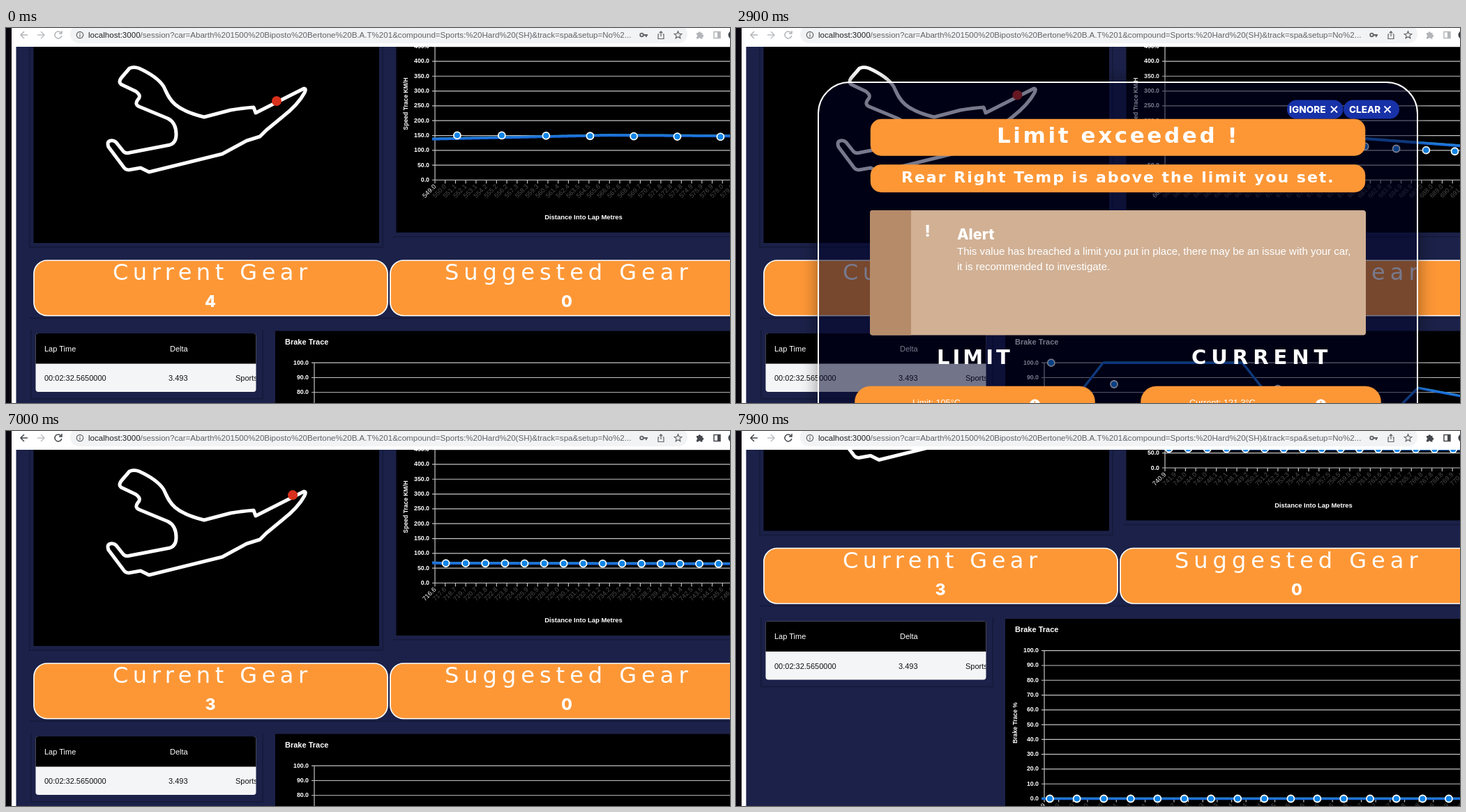
Recreate the animation shown at these times as an HTML page. Size 1038x539 px, loop 8000 ms.

```html
<!DOCTYPE html>
<html lang="en">
<head>
<meta charset="utf-8">
<title>Session dashboard</title>
<style>
  html, body { margin: 0; width: 100%; height: 100%; overflow: hidden; background: #08050f; }
  #stage { position: absolute; left: 0; top: 0; width: 1038px; height: 539px; overflow: hidden; }
  svg { position: absolute; left: 0; top: 0; display: block; }
  text { font-family: "Liberation Sans", Arial, sans-serif; fill: #fff; white-space: pre; }
  .wide { font-family: "DejaVu Sans", sans-serif; }
  .heavy { font-family: Inter, sans-serif; font-weight: 800; }
  .mid { text-anchor: middle; }
  .dark { fill: #111; }
  .tick { font-size: 8.8px; font-weight: 700; text-anchor: end; stroke: none; }
  .axis { font-size: 8.65px; font-weight: 700; text-anchor: middle; }
  .dist { font-size: 9.2px; text-anchor: end; fill: #4d4d4d; }
  .dist.first { fill: #fff; }
  .cell { font-size: 11px; }
  .grid { stroke: #c4c4c4; stroke-width: 1.2; fill: none; }
  .mark { fill: #1085e8; stroke: #fff; stroke-width: 1.8; }
  .orange { fill: #fd9736; }
  #view { position: absolute; left: 8px; top: 27px; width: 1030px; height: 512px; overflow: hidden; background: #fff; }
  #view svg { left: -8px; top: -27px; }
  #modal, #shade { position: absolute; inset: 0; }
  #shade { background: #000; }
  #panel { position: absolute; left: 109px; top: 50px; width: 857px; height: 700px;
    border: 2px solid #fff; border-radius: 46px; background: rgba(0, 2, 40, .53);
    box-shadow: 0 0 24px rgba(0, 0, 0, .4); }
  #icons { --ink: #b3b5b8; fill: none; stroke-width: 1.5; }
  #icons.active { --ink: #45484c; }
  .ink { stroke: var(--ink); }
  .soft { stroke: #5f6368; }
</style>
</head>
<body>
<div id="stage">
  <svg width="1038" height="27">
    <rect x="8" width="1030" height="27" fill="#fff"/>
    <rect x="92" y="-4" width="885" height="26" rx="13" fill="#f1f3f4"/>
    <text x="118" y="14" font-size="11.57" style="fill:#5f6368"><tspan fill="#202124">localhost:3000</tspan>/session?car=Abarth%201500%20Biposto%20Bertone%20B.A.T%201&amp;compound=Sports:%20Hard%20(SH)&amp;track=spa&amp;setup=No%2...</text>
    <g id="icons">
      <path class="ink" d="M31 10H21M26 5l-5 5 5 5"/>
      <path d="M45 10h10M50 5l5 5-5 5" stroke="#bfc1c4"/>
      <path class="ink" d="M79 7a5 5 0 1 0 .8 4M80 4v4h-4"/>
      <circle class="soft" cx="106" cy="10" r="4.7" stroke-width="1.2"/>
      <path class="soft" d="M106 9.3v3.4M106 7v1.3" stroke-width="1.2"/>
      <circle class="soft" cx="911.5" cy="10" r="2.3" stroke-width="1.8"/>
      <path class="soft" d="M914 10h6M917.8 10v3" stroke-width="2"/>
      <path class="soft" d="M936.5 9H935v6.5h8V9h-1.5M939 12V5M936.7 7.2l2.3-2.4 2.3 2.4" stroke-width="1.2"/>
      <path class="soft" d="M963.5 4.8l1.5 3.5 3.8.3-2.9 2.5.9 3.7-3.3-2-3.3 2 .9-3.7-2.9-2.5 3.8-.3z" stroke-width="1.2"/>
      <path d="M990 7h2.5a1.8 1.8 0 1 1 3.6 0h2.4v2.5a1.8 1.8 0 1 1 0 3.6v2.4h-2.6a1.7 1.7 0 0 0-3.3 0H990v-2.7a1.7 1.7 0 0 0 0-3.3z" fill="var(--ink)"/>
      <path class="ink" d="M1015 5.500h9v9h-9z"/>
      <path class="ink" d="M1022 5v10" stroke-width="4"/>
      <circle cx="1042" cy="10" r="6.5" fill="#3a3f44"/>
    </g>
  </svg>

  <div id="view">
    <svg width="1038" height="539">
      <rect x="14.5" y="27" width="1030" height="520" fill="#1b2148"/>
      <g id="page">
        <path d="M34 0V315H540V0M555 300H1040M34 417H1040M36 434V533H368V434" fill="none" stroke="#151a3a" stroke-width="1.5"/>
        <rect x="39.5" y="-100" width="495.5" height="409"/>
        <path fill="none" stroke="#fff" stroke-width="5" stroke-linejoin="round" d="M177 58
          Q183 55 191 58Q217 70 226 84C234 100 236 116 284 128L322 118Q340 115 355 114L358 122L427 87
          Q431 87 428 93Q419 110 396 128L373 147L364 156L345 162L310 181L205 207L193 201L176 204
          Q171 204 168 199L147 171Q144 163 150 162Q156 161 160 167L168 177Q171 181 178 179L235 168
          Q244 165 244 153Q244 136 232 130L191 113Q184 110 189 103Q195 97 186 91L165 81Q161 78 165 72Z"/>
        <circle id="car" r="7" fill="#d8301c"/>

        <rect x="559.5" y="-100" width="500" height="394"/>
        <rect x="386" y="435.5" width="670" height="500"/>
        <g id="speed"></g>
        <g id="brake"></g>
        <text class="axis" transform="translate(576 109) rotate(-90)">Speed Trace KM/H</text>
        <text class="axis" x="828" y="275" style="font-size:9.45px">Distance Into Lap Metres</text>
        <text class="axis" transform="translate(402.5 585) rotate(-90)">Brake Trace %</text>
        <text x="400" y="454.5" font-size="11" font-weight="700">Brake Trace</text>

        <g class="orange" stroke="#fff" stroke-width="1.7">
          <rect x="40" y="334" width="507" height="79.5" rx="19"/>
          <rect x="551" y="334" width="507" height="79.5" rx="19"/>
        </g>
        <text class="wide" x="153" y="362" font-size="32" letter-spacing="6.5">Current Gear</text>
        <text class="wide" x="629" y="362" font-size="32" letter-spacing="7">Suggested Gear</text>
        <text class="heavy mid" id="gear" x="293" y="401" font-size="23"></text>
        <text class="heavy mid" x="804" y="401" font-size="23">0</text>

        <rect x="42.5" y="439" width="316" height="84" rx="4" fill="#f4f5f7"/>
        <path d="M42.500 482.500V443a4 4 0 0 1 4-4h308a4 4 0 0 1 4 4v39.500z"/>
        <clipPath id="table"><path d="M42 439H358.500V523H42z"/></clipPath>
        <g class="cell" clip-path="url(#table)">
          <text x="55" y="464.5">Lap Time</text>
          <text x="235" y="464.5">Delta</text>
          <text class="dark" x="55" y="507">00:02:32.5650000</text>
          <text class="dark" x="233" y="507">3.493</text>
          <text class="dark" x="329" y="507">Sports</text>
        </g>
        <g id="tip">
          <path d="M821 0V218" stroke="#999" stroke-dasharray="3 2"/>
          <path d="M801.500 221H817l4-4 4 4h15.500v27.500h-39z" fill="#eceef0" stroke="#c4c7ca"/>
          <text class="mid dark" x="821" y="238" font-size="9.5">744.7</text>
        </g>
      </g>
    </svg>

    <div id="modal">
      <div id="shade"></div>
      <div id="panel"></div>
      <svg width="1038" height="539">
        <g fill="#1731a8">
          <rect x="790" y="103.5" width="80.5" height="27" rx="13.5"/>
          <rect x="871" y="103.5" width="80" height="27" rx="13.5"/>
        </g>
        <text class="heavy" x="793" y="122" font-size="13.7">IGNORE</text>
        <text class="heavy" x="879" y="122" font-size="13.5">CLEAR</text>
        <path d="M853 112.500l9 9m0-9l-9 9M929.500 112.500l9 9m0-9l-9 9" stroke="#fff" stroke-width="1.8"/>
        <g class="orange" stroke="#fd9736" stroke-opacity=".5">
          <rect x="193" y="131" width="709" height="52.5" rx="15"/>
          <rect x="193" y="196.5" width="709" height="39.5" rx="15"/>
          <rect x="170.5" y="515" width="344" height="80" rx="22"/>
          <rect x="580.5" y="515" width="344" height="80" rx="22"/>
        </g>
        <g font-weight="700">
          <text class="wide" x="374" y="164.5" font-size="31" letter-spacing="3.6">Limit exceeded !</text>
          <text class="wide" x="237" y="221.5" font-size="22" letter-spacing="2">Rear Right Temp is above the limit you set.</text>
          <text class="wide" x="288" y="482.5" font-size="29" letter-spacing="4">LIMIT</text>
          <text class="wide" x="653" y="482.5" font-size="29" letter-spacing="7">CURRENT</text>
        </g>
        <rect x="192" y="262" width="711" height="179.5" rx="4" fill="#d1b094"/>
        <path d="M251 262V441.500H196a4 4 0 0 1-4-4V266a4 4 0 0 1 4-4z" fill="#b68b6a"/>
        <text class="heavy mid" x="274.5" y="300" font-size="23">!</text>
        <text class="heavy" x="317" y="304" font-size="21.6">Alert</text>
        <g font-size="15">
          <text x="317" y="326">This value has breached a limit you put in place, there may be an issue with your car,</text>
          <text x="317" y="348">it is recommended to investigate.</text>
        </g>
        <g font-size="12.6">
          <text x="253" y="543">Limit: 105°C</text>
          <text x="650" y="543">Current: 121.3°C</text>
        </g>
        <g fill="#fff"><circle cx="428.5" cy="541" r="7.5"/><circle cx="838.5" cy="541" r="7.5"/></g>
        <path d="M428.500 536.500v2m0 1.500v6M838.500 536.500v2m0 1.500v6" stroke="#fd9736" stroke-width="2"/>
      </svg>
    </div>
  </div>
</div>

<script>
const $ = id => document.getElementById(id);
const LOOP = 8000, RIGHT = 1046, GAP = 1.0345;

// Left end of the axes in lap metres: steady, then braking, one update per 400 ms
const lapStart = n => n <= 7 ? 549 + 14.525 * n : 661.1 + 9.01 * (n - 8) - .259 * (n - 8) ** 2;

// Key points of the speed trace, joined by straight lines: [lap distance, km/h]
const speedKeys = [[530, 135], [552, 151], [585, 144], [611, 160], [650, 191], [685, 104], [712, 67], [780, 62]];
function speedAt(d) {
  const i = Math.max(1, speedKeys.findIndex(k => k[0] > d));
  const [a, p] = speedKeys[i - 1], [b, q] = speedKeys[i];
  return p + (q - p) * (d - a) / (b - a);
}

// Each press of the brake is a wedge, cut off at 0 and 100 %
const wedge = (d, peak, at, rise, fall) => peak - (d < at ? (at - d) * rise : (d - at) * fall);
const brakeAt = d => Math.min(100, Math.max(0,
  wedge(d, 160, 659.9, 12, 12), wedge(d, 83, 677.5, 9.5, 1.8), wedge(d, 77, 705.4, 13, 13)));

// Telemetry samples come at a fixed rate, so their spacing follows the speed
const samples = [], RATE = .0299;
for (let d = 717.7; d < 776; d += speedAt(d) * RATE) samples.push(d);
for (let d = 717.7; d > 545;) samples.push(d -= speedAt(d) * RATE);

function makeChart(id, { x: x0, base, rows, row, unit, step, weight, value }) {
  const scale = step / GAP;
  const yAt = d => base - value(d) / unit * row;
  let grid = `<path d="M${x0} ${base - rows * row}V${base}"/>`;
  for (let i = 0; i <= rows; i++) {
    const y = base - i * row;
    grid += `<path d="M${x0 - 4} ${y}H${RIGHT}"/><text class="tick" x="${x0 - 8}" y="${y + 2.5}">${(i * unit).toFixed(1)}</text>`;
  }
  for (let x = x0; x < RIGHT; x += step) grid += `<path d="M${x} ${base}v5"/>`;
  $(id).innerHTML = `<g class="grid">${grid}</g><g></g>`;
  const layer = $(id).lastChild;

  // The line trails the markers by one update
  return (start, lag) => {
    let labels = "", line = "", marks = "";
    for (let i = 0; x0 + i * step < RIGHT; i++) {
      labels += `<text class="dist${i ? "" : " first"}" transform="translate(${x0 + 2 + i * step} ${base + 10}) rotate(-45)">${(start + i * GAP).toFixed(1)}</text>`;
    }
    for (let x = x0 - 4; x <= RIGHT; x += 2) {
      line += `${x},${yAt(start + (x - x0) / scale - lag).toFixed(2)} `;
    }
    for (const d of samples) {
      const x = x0 + (d - start) * scale;
      if (d >= start && x < RIGHT) marks += `<circle class="mark" r="5" cx="${x}" cy="${yAt(d)}"/>`;
    }
    layer.innerHTML = `${labels}<g fill="none"><polyline points="${line}" stroke="#1a6cdc" stroke-width="${weight}"/>
      <polyline points="${line}" transform="translate(0 -1.2)" stroke="#2886cc" stroke-width="1.2"/></g>${marks}`;
  };
}

const drawSpeed = makeChart("speed", { x: 615, base: 218.5, rows: 9, row: 21.32, unit: 50,
  step: 14.72, weight: 4, value: speedAt });
const drawBrake = makeChart("brake", { x: 442, base: 694, rows: 10, row: 21.28, unit: 10,
  step: 20.66, weight: 3.4, value: brakeAt });

let shown;
function render(t) {
  const tick = Math.floor(t / 100) * 100;
  const n = Math.floor((Math.min(t, 6100) + 300) / 400);
  const start = lapStart(n) + (t < 7400 ? 0 : (tick - 7000) * .027);
  if (start !== shown) {
    const lag = lapStart(n) - lapStart(n - 1);
    drawSpeed(start, lag);
    drawBrake(start, lag);
    shown = start;
  }

  const carStep = Math.floor((start - 493) / 71);
  $("car").setAttribute("cx", 388 + 7.7 * carStep);
  $("car").setAttribute("cy", 105 - 4.3 * carStep);
  $("gear").textContent = t < 500 ? 4 : t < 2900 ? 5 : 3;

  const scroll = 165.5 * (1 - Math.exp(-.019 * Math.max(0, tick - 7360)));
  $("page").setAttribute("transform", `translate(0 ${-scroll})`);
  $("modal").style.display = t >= 2900 && t < 7000 ? "" : "none";
  $("shade").style.opacity = Math.min(.5, Math.max(0, tick - 2900) / 800);
  $("tip").style.display = tick === 7500 ? "" : "none";
  $("icons").classList.toggle("active", t >= 4500);
}

const t0 = performance.now();
function frame() {
  render((performance.now() - t0) % LOOP);
  requestAnimationFrame(frame);
}
frame();
</script>
</body>
</html>
```
